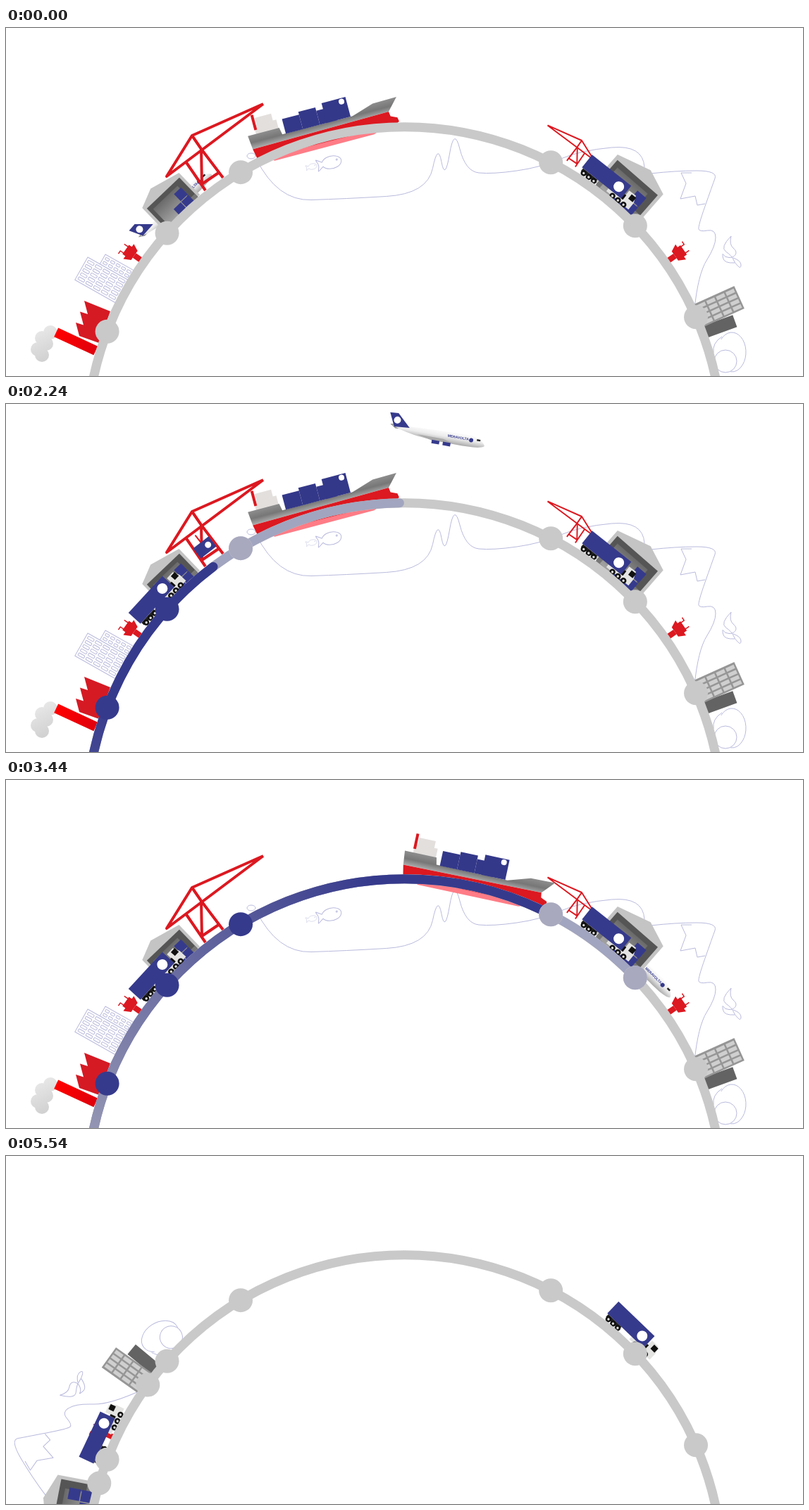
Recreate the animation shown at these times as an HTML page with a canvas. Size 1131 by 495 pixels, loop 5.64 s.

```html
<!DOCTYPE html>
<html lang="en">
<head>
<meta charset="utf-8">
<title>Supply chain</title>
<style>
html, body { margin: 0; width: 100%; height: 100%; overflow: hidden; background: #fff; }
canvas { display: block; width: 1131px; height: 495px; }
</style>
</head>
<body>
<canvas id="stage" width="1131" height="495"></canvas>
<script>
const c = document.getElementById('stage').getContext('2d');
const CX = 565.5, CY = 592, R = 451.3, LOOP = 5640;
const BLUE = '#363a8c', GREY = '#c9c9c9', PALE = '#a2a5bf', RED = '#dc1820', LINE = '#b9badd';
const STOPS = [-159.2, -138.3, -121, -62.6, -43.5, -23.6];
const DOCK = -51.5;

const rad = d => d * Math.PI / 180;
const clamp = v => Math.max(0, Math.min(1, v));
const ease = (t, a, b) => (1 - Math.cos(Math.PI * clamp((t - a) / (b - a)))) / 2;
const mix = (a, b, k) => a + (b - a) * k;
const move = (t, t0, t1, a, b) => mix(a, b, ease(t, t0, t1));

function path(pts) {
  c.beginPath();
  pts.forEach(p => c.lineTo(...p));
}
function poly(fill, ...pts) { path(pts); c.fillStyle = fill; c.fill(); }
function line(color, width, ...pts) {
  path(pts);
  c.strokeStyle = color;
  c.lineWidth = width;
  c.stroke();
}
// Smooth stroke through the midpoints of its key points
function curve(...pts) {
  c.beginPath();
  c.moveTo(...pts[0]);
  for (let i = 1; i < pts.length - 1; i++) {
    const [x, y] = pts[i], [u, v] = pts[i + 1];
    const k = i < pts.length - 2 ? .5 : 1;
    c.quadraticCurveTo(x, y, mix(x, u, k), mix(y, v, k));
  }
  c.strokeStyle = LINE;
  c.lineWidth = 1;
  c.stroke();
}
function disc(x, y, r, fill) {
  c.beginPath();
  c.arc(x, y, r, 0, 7);
  c.fillStyle = fill;
  c.fill();
}
function oval(x, y, rx, ry, from = 0, to = 360) {
  c.beginPath();
  c.ellipse(x, y, rx, ry, 0, rad(from), rad(to));
  c.strokeStyle = LINE;
  c.lineWidth = 1;
  c.stroke();
}
function box(fill, x, y, w, h) { c.fillStyle = fill; c.fillRect(x, y, w, h); }
function shade(x0, y0, x1, y1, ...cols) {
  const g = c.createLinearGradient(x0, y0, x1, y1);
  cols.forEach((k, i) => g.addColorStop(i / (cols.length - 1), k));
  return g;
}
function at(x, y, deg, draw, sx = 1, sy = sx) {
  c.save();
  c.translate(x, y);
  c.rotate(rad(deg));
  c.scale(sx, sy);
  draw();
  c.restore();
}
const polar = (deg, r = R) => [CX + r * Math.cos(rad(deg)), CY + r * Math.sin(rad(deg))];
function onRing(deg, r, draw, scale = 1, tilt = 0) {
  at(...polar(deg, r), deg + 90 + tilt, draw, scale);
}
function spin(deg, draw) {
  at(CX, CY, deg, () => { c.translate(-CX, -CY); draw(); });
}

// Heads of the two trails: goods by sea (blue) and by air (pale)
const express = t => move(t, 3480, 4480, DOCK, 0);
const lastTruck = t => move(t, 4240, 5240, DOCK, 1);
function blueHead(t) {
  const [a, b, d, e, f] = STOPS;
  if (t < 40) return -180;
  if (t < 940) return move(t, 40, 700, -178, a);
  if (t < 1640) return move(t, 940, 1540, a, b);
  if (t < 2640) return move(t, 1640, 2640, b, d);
  if (t < 3560) return move(t, 2640, 3540, d, e);
  return Math.max(move(t, 3580, 4200, e, f), lastTruck(t) - 2.3);
}
function paleHead(t) {
  if (t < 1540) return -180;
  return Math.max(move(t, 1540, 2940, STOPS[1], STOPS[4]), express(t) - 1.2 > STOPS[4] ? express(t) - 1.2 : -180);
}
function arrival(head, deg) {
  let t = 0;
  while (t < LOOP && head(t) < deg - .2) t += 10;
  return t;
}
const NODES = STOPS.map(deg => ({ deg, blue: arrival(blueHead, deg), pale: arrival(paleHead, deg) }));

function fish(x, y, s) {
  at(x, y, -14, () => {
    oval(0, 0, 14, 9, -160, 160);
    curve([-13, -3], [-19, -7], [-22, -9], [-18, 0], [-22, 9], [-19, 7], [-13, 3]);
    oval(8, -2, 1, 1);
  }, s);
}

function landscape() {
  // Valley, peaks and far hills
  curve([355, 186], [385, 246], [481, 243], [598, 236], [613, 163], [623, 218], [636, 140], [652, 204], [690, 208], [760, 198], [815, 174], [904, 166], [906, 198]);
  oval(348, 182, 6, 4);
  fish(462, 191, 1);
  fish(435, 197, .45);
  // Mountain with its snow line
  curve([915, 207], [950, 203], [1010, 203], [1002, 225], [982, 282], [984, 290], [1007, 286], [1007, 310], [982, 350], [977, 400]);
  line(LINE, 1, [973, 206], [958, 206], [965, 221], [957, 243], [978, 239], [981, 252], [992, 250]);
  // Bird
  curve([1029, 296], [1013, 312], [1030, 324], [1034, 334], [1043, 343], [1043, 331], [1032, 327]);
  curve([1029, 296], [1026, 308], [1038, 318], [1032, 327], [1020, 326], [1016, 319], [1019, 335], [1034, 334]);
  // Trees
  oval(1030, 461, 20, 28, -140, 95);
  oval(1021, 474, 16, 16);
  curve([1016, 439], [1002, 448], [1004, 462]);
}

function office(x, y, w, h, cols, rows) {
  at(x, y, 29.5, () => {
    box('#fff', 0, 0, w, h);
    c.strokeStyle = LINE;
    c.lineWidth = 1;
    c.strokeRect(0, 0, w, h);
    const dx = (w - 3) / cols, dy = (h - 3) / rows;
    for (let i = 0; i < cols * rows; i++) {
      c.beginPath();
      c.roundRect(3 + (i % cols) * dx, 3 + Math.floor(i / cols) * dy, dx - 3, dy - 3, 1);
      c.stroke();
    }
  });
}

function factory() {
  const smoke = shade(35, 425, 60, 475, '#ececec', '#cfcfcf');
  for (let i = 0; i < 5; i++) disc(59 - 3 * i + (i % 2 ? -5 : 4), 433 + 8 * i, 10, smoke);
  const teeth = [];
  for (let i = 0; i < 3; i++) teeth.push([111 - 6 * i, 388 + 15.5 * i], [116 - 6 * i, 407 + 15.5 * i]);
  poly('#d51a24', [148, 403], ...teeth, [132, 448]);
  at(72, 431, 25, () => box(shade(0, 0, 60, 0, '#ff0000', '#e0000c'), 0, -5, 62, 14));
}

function tower(deg) {
  onRing(deg, 455, () => {
    box(RED, -4, -13, 8, 16);
    poly(RED, [-8, -13], [8, -13], [13, -23], [-13, -23]);
    box(RED, -8, -28, 16, 6);
    line(RED, 1.5, [-6, -27], [-6, -33], [-11, -33]);
    line(RED, 1.5, [5, -27], [5, -34]);
  });
}

function cityBlock() {
  at(988, 424, -20, () => box('#636363', 0, 0, 46, 18));
  at(976, 393, -24.3, () => {
    box('#969696', 0, 0, 63, 35);
    for (let i = 0; i < 16; i++) box('#cfcfcf', 3 + (i % 4) * 15, 3 + (i >> 2) * 8, 12.5, 5.5);
  });
}

// Tip points right; a negative sx mirrors it
function crane(x, y, sx, sy) {
  const apex = [0, 0], tip = [101, -45], tail = [-36, 58], knee = [44, 60], bend = [13, 19], foot = [14, 69];
  at(x, y, 0, () => {
    line(RED, 4, tip, tail, apex, tip);
    line(RED, 4, apex, bend, knee);
    line(RED, 4, bend, foot, [39, 52]);
    line(RED, 4, [-9, 37], [19, 78]);
  }, sx, sy);
}

function store(deg, scale, lean) {
  onRing(deg, R, () => {
    poly('#c4c4c4', [-43, -7], [-43, -58], [lean, -72], [43, -58], [43, -7]);
    box('#555', -38, -52, 76, 46);
    box('#777', -38, -14, 76, 10);
    box(shade(0, -44, 0, -8, '#6a6a6a', '#a0a0a0'), -31, -44, 57, 38);
    for (const [x, y] of [[0, 0], [1, 0], [1, 1]]) box(BLUE, -6 + x * 18, -20 - y * 18, 16.5, 16.5);
  }, scale);
}

function truck(deg) {
  onRing(deg, 455, () => {
    box('#e2e2e2', 0, -10, 40, 5);
    box('#222', -46, -10, 26, 5);
    box(BLUE, -48, -33, 71, 23);
    poly('#e4e4e2', [25, -26], [37, -26], [41, -16], [41, -4], [25, -4]);
    box('#111', 31, -24, 8, 8);
    box('#111', 23, -18, 3, 8);
    for (let i = 0; i < 6; i++) {
      const x = i < 3 ? -41 + 9 * i : -19 + 10 * i;
      disc(x, -5, 4.3, '#111');
      disc(x, -5, 1.7, '#ddd');
    }
    disc(10, -21, 7.5, '#fff');
  });
}

function plane(t) {
  const e = ease(t, 1490, 2900), climb = 82;
  const r = 472 + climb * Math.sin(Math.PI * e) ** 2;
  const pitch = -climb * 2 * Math.sin(2 * Math.PI * e) / r;
  onRing(mix(-133.9, -45.3, e), r, () => {
    poly('#8f8f8f', [-60, 3], [-68, -2], [-61, -3], [-46, 2]);
    c.beginPath();
    c.moveTo(-65, -1);
    c.quadraticCurveTo(-45, -3, 36, -6);
    c.bezierCurveTo(55, -8, 68, 1, 69, 6);
    c.bezierCurveTo(64, 11, 46, 11, 30, 11);
    c.bezierCurveTo(-15, 11, -45, 8, -65, -1);
    c.fillStyle = shade(0, -7, 0, 11, '#fff', '#ececec', '#aaa');
    c.fill();
    poly(BLUE, [-71, -18], [-59, -19], [-40, -1], [-62, 1]);
    disc(-59, -9, 5, '#fff');
    poly('#aaa', [-28, 6], [10, 6], [24, 10], [-6, 11]);
    for (const x of [-6, 10]) box(BLUE, x, 10, 11, 5);
    box('#222', 57, -2, 5, 2.5);
    c.fillStyle = BLUE;
    c.font = 'bold 5px "Liberation Sans", Arial, sans-serif';
    c.fillText('MERAVOLTA', 15, 2);
    disc(49, 1, 3, BLUE);
  }, 1, pitch * 180 / Math.PI);
}

function ship(t) {
  onRing(move(t, 2640, 3540, -104.8, -77), 451, () => {
    poly('#ff7c86', [-90, 4], [100, 4], [71, 14], [-75, 14]);
    box('#e2dfdd', -87, -52, 24, 26);
    box('#e2dfdd', -91, -42, 33, 14);
    box(RED, -92, -57, 4, 22);
    poly(shade(0, -28, 0, -10, '#8a8a8a', '#777', '#aaa'), [-103, -29.5], [-57, -29.5], [-55, -19.5], [48, -19], [80, -29], [115, -29.5], [99, -12], [-101, -9.5]);
    poly(RED, [-101, -9.5], [99, -12], [100, -5], [109, -1], [110, 5], [104, 8], [-98, 6]);
    for (let i = 0; i < 4; i++) {
      const x = -50 + 25 * i - (i > 2 ? 15 : 0), top = [-40.5, -44.5, -39.5, -48][i];
      box('#343889', x, top, i > 2 ? 35 : 25, -19 - top);
    }
    disc(38, -43, 4, '#fff');
  });
}

function cargo(x, y, deg, scale) {
  at(x, y, deg, () => {
    line(RED, 2, [0, -22], [0, -8]);
    box(BLUE, -14, -9, 28, 18);
    disc(6, 0, 4.5, '#fff');
  }, scale);
}

function arc(color, to) {
  c.beginPath();
  c.arc(CX, CY, R, rad(-180), rad(to));
  c.strokeStyle = color;
  c.lineWidth = 13;
  c.stroke();
}

// Solid just behind the head, then fading to grey
function trail(head) {
  const p = Math.max(-180, head - 31), span = 114;
  const g = c.createConicGradient(Math.PI, CX, CY);
  const tint = m => `rgb(${mix(54, 201, m)},${mix(58, 201, m)},${mix(140, 201, m)})`;
  g.addColorStop(0, tint(clamp((p + 180) / span)));
  g.addColorStop(Math.max(0, (p - span + 180) / 360), tint(clamp((p + 180) / span)));
  g.addColorStop((p + 180) / 360, BLUE);
  return g;
}

function node({ deg, blue, pale }, t) {
  const swell = from => 17 + 5 * Math.sin(Math.PI * clamp((t - from) / 300));
  const [x, y] = polar(deg);
  if (t >= blue) return disc(x, y, swell(blue), BLUE);
  if (t >= pale) disc(x, y, swell(pale), '#d6d6e6');
  disc(x, y, 17, t >= pale ? '#a8a9be' : GREY);
}

function paint(t) {
  const reset = t >= 5540;
  const turn = reset ? -120.2 : t >= 5440 ? 6.5 : 0;
  const start = STOPS[0] + 4.4;

  box('#fff', 0, 0, 1131, 495);
  c.lineCap = 'butt';
  c.lineJoin = 'round';
  spin(turn, () => {
    landscape();
    office(141, 322, 47, 16, 5, 2);
    office(116, 326, 66, 37, 5, 5);
    factory();
    tower(-145);
    tower(-34.9);
    cityBlock();
  });
  if (!reset) {
    plane(t);
    if (t >= 3500) truck(lastTruck(t));
  }
  spin(turn, () => {
    crane(264, 153, 1, 1);
    crane(817, 160, -.48, .48);
    store(-133.8, .84, -10);
    store(-48.9, 1, 7);
  });
  if (reset) {
    truck(start);
    truck(-46.1);
  } else {
    truck(express(t));
    if (t >= 40) truck(t < 940 ? move(t, 40, 700, -178, start) : move(t, 940, 1540, start, -137.4));
    const lift = (t - 1840) / 400, drop = (t - 3640) / 300;
    if (lift >= 0 && lift < 2) cargo(262 + 20 * lift, 230 - 26 * lift, -38, 1);
    if (drop >= 0 && drop < 1.6) cargo(780 + 23 * drop, 166 + 14 * drop, 35, .5);
    ship(t);
  }

  c.lineCap = 'round';
  arc(GREY, 180);
  if (!reset) {
    arc(PALE, paleHead(t));
    arc(trail(blueHead(t)), blueHead(t));
  }
  if (turn) spin(turn, () => NODES.forEach(n => node(n, -1)));
  NODES.forEach(n => node(n, reset ? -1 : t));
}

// The picture advances in steps of 100 ms after a short first hold
function tick(now) {
  const t = now % LOOP;
  paint(t < 40 ? 0 : 40 + Math.floor((t - 40) / 100) * 100);
  requestAnimationFrame(tick);
}
paint(0);
requestAnimationFrame(tick);
</script>
</body>
</html>
```
